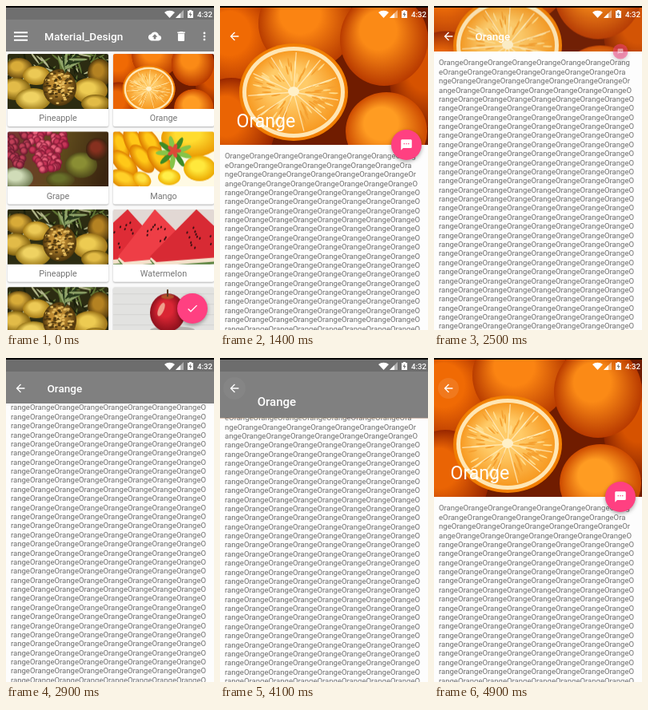
These frames come from a looping animation (260 by 406 pixels, 5700 ms). An HTML page with a canvas:

```html
<!DOCTYPE html>
<html>
<head>
<meta charset="utf-8">
<style>
html, body { margin: 0; width: 260px; height: 406px; overflow: hidden; background: #fafafa; }
canvas { display: block; }
</style>
</head>
<body>
<canvas id="stage" width="260" height="406"></canvas>
<script>
const LOOP = 5700, STEP = 100, TOP = 2, DP = 0.677;
const PINK = '#ff4081', GRAY = '#808080', FONT = 'Roboto, sans-serif';
const screen = document.getElementById('stage').getContext('2d');

const ICONS = {
  menu: 'M3 18h18v-2H3v2zm0-5h18v-2H3v2zm0-7v2h18V6H3z',
  upload: 'M19.35 10.04C18.67 6.59 15.64 4 12 4 9.11 4 6.6 5.64 5.35 8.04 2.34 8.36 0 10.91 0 14c0 3.31 2.69 6 6 6h13c2.76 0 5-2.24 5-5 0-2.64-2.05-4.78-4.65-4.96zM14 13v4h-4v-4H7l5-5 5 5h-3z',
  trash: 'M6 19c0 1.1.9 2 2 2h8c1.1 0 2-.9 2-2V7H6v12zM19 4h-3.5l-1-1h-5l-1 1H5v2h14V4z',
  more: 'M12 8c1.1 0 2-.9 2-2s-.9-2-2-2-2 .9-2 2 .9 2 2 2zm0 2c-1.1 0-2 .9-2 2s.9 2 2 2 2-.9 2-2-.9-2-2-2zm0 6c-1.1 0-2 .9-2 2s.9 2 2 2 2-.9 2-2-.9-2-2-2z',
  check: 'M9 16.17L4.83 12l-1.42 1.41L9 19 21 7l-1.41-1.41z',
  back: 'M20 11H7.83l5.59-5.59L12 4l-8 8 8 8 1.41-1.41L7.83 13H20v-2z',
  chat: 'M20 2H4c-1.1 0-1.99.9-1.99 2L2 22l4-4h14c1.1 0 2-.9 2-2V4c0-1.1-.9-2-2-2zM9 11H7V9h2v2zm4 0h-2V9h2v2zm4 0h-2V9h2v2z'
};
for (const name in ICONS) ICONS[name] = new Path2D(ICONS[name]);

const clamp = v => Math.max(0, Math.min(1, v));
const ramp = (t, from, to) => clamp((t - from) / (to - from));
const smooth = u => u * u * (3 - 2 * u);
const lerp = (a, b, u) => a + (b - a) * u;

function makeRandom(seed) {
  return () => (seed = (seed * 16807) % 2147483647) / 2147483647;
}

function rect(c, x, y, w, h, color) {
  c.fillStyle = color;
  c.fillRect(x, y, w, h);
}

function oval(c, x, y, rx, ry, color, angle = 0) {
  c.fillStyle = color;
  c.beginPath();
  c.ellipse(x, y, rx, ry, angle, 0, 7);
  c.fill();
}

function poly(c, points, color) {
  c.fillStyle = color;
  c.beginPath();
  points.forEach(p => c.lineTo(...p));
  c.fill();
}

// Shaded round body, lit from the upper left
function ball(c, x, y, rx, ry, light, dark, angle = 0) {
  c.save();
  c.translate(x, y);
  c.rotate(angle);
  c.scale(rx, ry);
  const shade = c.createRadialGradient(-.2, -.3, .1, 0, 0, 1);
  shade.addColorStop(0, light);
  shade.addColorStop(.35, light);
  shade.addColorStop(1, dark);
  oval(c, 0, 0, 1, 1, shade);
  c.restore();
}

function text(c, value, x, y, size, color, weight = 400, align = 'left') {
  c.font = `${weight} ${size}px ${FONT}`;
  c.textAlign = align;
  c.fillStyle = color;
  c.fillText(value, x, y);
}

function icon(c, name, x, y, scale = DP) {
  c.save();
  c.translate(x, y);
  c.scale(scale, scale);
  c.translate(-12, -12);
  c.fillStyle = '#fff';
  c.fill(ICONS[name]);
  c.restore();
}

function picture(w, h, paint) {
  const canvas = document.createElement('canvas');
  canvas.width = w;
  canvas.height = h;
  paint(canvas.getContext('2d'));
  return canvas;
}

const orange = picture(260, 172, c => {
  const random = makeRandom(33);
  rect(c, 0, 0, 260, 172, '#701c00');
  ball(c, 262, 90, 50, 60, '#d65200', '#8a2400');
  ball(c, 20, 45, 62, 66, '#f06a04', '#a62c00');
  ball(c, 108, 20, 60, 58, '#fb8412', '#b83c00');
  ball(c, 205, 40, 55, 58, '#fb8a16', '#b83a00');
  ball(c, 14, 148, 55, 60, '#ea6404', '#982600');
  ball(c, 208, 155, 51, 49, '#ff9c22', '#cc4a00');
  ball(c, 92, 106, 68, 61, '#ffae30', '#f07c00');
  oval(c, 92, 106, 64, 57, '#ffe6b4');
  ball(c, 92, 106, 59, 52, '#ffcb68', '#f79a22');
  for (let i = 0; i < 90; i++) {
    const a = random() * 7, r = 18 + random() * 32;
    oval(c, 92 + r * Math.cos(a), 106 + r * .88 * Math.sin(a), 6, 1, i % 2 ? '#ffdc8c' : '#f5a030', a);
  }
  c.strokeStyle = 'rgba(255,240,200,.75)';
  c.lineWidth = 1.3;
  for (let i = 0; i < 11; i++) {
    const a = i * Math.PI * 2 / 11 + .2;
    c.beginPath();
    c.moveTo(92, 106);
    c.lineTo(92 + 57 * Math.cos(a), 106 + 50 * Math.sin(a));
    c.stroke();
  }
  oval(c, 92, 105, 7, 6, '#fff0c8');
});

const pineapple = picture(126, 69, c => {
  const random = makeRandom(71);
  rect(c, 0, 0, 126, 69, '#2c2c12');
  for (let i = 0; i < 90; i++) {
    const x = random() * 126, y = random() * 40, a = random() * 3;
    oval(c, x, y, 9, 1.2, ['#5f7434', '#1b200c', '#b4b88c'][i % 3], a);
  }
  ball(c, 14, 18, 17, 13, '#d8ab38', '#6c4d10');
  ball(c, 36, 27, 17, 12, '#ecc955', '#a67b16');
  ball(c, 10, 44, 19, 14, '#e2bb48', '#80600f');
  ball(c, 32, 57, 22, 14, '#efd262', '#9c7a1a');
  ball(c, 115, 24, 15, 18, '#b48222', '#50380c');
  ball(c, 103, 46, 22, 16, '#edcb52', '#9b7217');
  ball(c, 110, 62, 18, 11, '#e2bb46', '#80600f');
  ball(c, 65, 42, 21, 23, '#bd8a32', '#4f360c');
  for (let i = 0; i < 90; i++) {
    const a = random() * 7, r = Math.sqrt(random());
    oval(c, 65 + 19 * r * Math.cos(a), 42 + 21 * r * Math.sin(a), 2, 1.2, i % 2 ? '#e8bf60' : '#4c360f');
  }
  for (let i = 0; i < 9; i++) {
    oval(c, 68 + i * 2.5, 13 - i % 3 * 3, 12, 1.6, i % 2 ? '#26381a' : '#8fa468', -2 + i * .25);
  }
});

const grape = picture(126, 69, c => {
  const random = makeRandom(19);
  const back = c.createLinearGradient(0, 0, 126, 40);
  back.addColorStop(0, '#7a3434');
  back.addColorStop(.55, '#5e4a1c');
  back.addColorStop(1, '#3a2410');
  rect(c, 0, 0, 126, 69, back);
  ball(c, 92, 42, 20, 16, '#8a8e34', '#504a1a');
  ball(c, 112, 22, 14, 14, '#86301f', '#3a2410');
  ball(c, 66, 60, 18, 10, '#68702a', '#50441a');
  ball(c, 12, 58, 20, 14, '#d0dcb8', '#707c54');
  for (let i = 0; i < 96; i++) {
    const y = i / 2, spread = 23 * (1 - (y / 60) ** 2);
    const side = random() * 2 - 1;
    if (i % 3) ball(c, 51 + side * spread, y, 5, 5, i % 2 ? '#e8607a' : '#c83658', '#7c1430');
    else ball(c, 12 + side * spread * .7, y * .9, 5, 5, '#c04058', '#5e1428');
  }
});

const mango = picture(126, 69, c => {
  rect(c, 0, 0, 126, 69, '#fffae4');
  ball(c, 98, 8, 38, 24, '#ffdc30', '#ea9a04');
  [[8, 18, 1.2], [26, 14, 1.1], [46, 14, 1], [14, 40, .8], [36, 34, .9], [58, 36, .9]].forEach(
    ([x, y, a]) => ball(c, x, y, 21, 11, '#ffc818', '#dc7a00', a));
  ball(c, 14, 60, 20, 11, '#ffd028', '#e08800', .4);
  ball(c, 36, 60, 12, 9, '#ffe040', '#eca000', .5);
  ball(c, 108, 46, 20, 16, '#ffe83c', '#eca800');
  ball(c, 70, 57, 14, 10, '#ffee48', '#f0b000');
  for (let i = 0; i < 9; i++) {
    const a = i * .7 + .3;
    oval(c, 76 + 13 * Math.cos(a), 26 + 11 * Math.sin(a), 10, 3.2, i % 2 ? '#3f8b25' : '#86c448', a);
  }
  for (let i = 0; i < 5; i++) {
    oval(c, 76 + 4 * Math.cos(i * 1.26), 24 + 4 * Math.sin(i * 1.26), 5, 2.5, '#dc4a38', i * 1.26);
  }
});

const melon = picture(126, 69, c => {
  const random = makeRandom(5);
  rect(c, 0, 0, 126, 69, '#e2d8d4');
  [[-45, 18, 66], [6, 52, 104], [46, 104, 160]].forEach(([left, apex, right], i) => {
    poly(c, [[left, 64], [apex, 0], [right, 58], [right, 66], [left + 8, 74]], '#5c8440');
    poly(c, [[left, 62], [apex, 0], [right, 56], [right, 63], [left + 8, 71]], '#f4e2cc');
    poly(c, [[left, 59], [apex, 0], [right, 53], [right - 3, 58], [left + 8, 66]], ['#de2c36', '#ee3e46', '#d82a34'][i]);
    for (let k = 0; k < 12; k++) {
      const u = .3 + random() * .6;
      oval(c, apex + (random() - .5) * 70 * u, 56 * u, 1, 1.6, '#3b1013', .4);
    }
  });
});

const apple = picture(126, 69, c => {
  rect(c, 0, 0, 126, 69, '#e2e2e0');
  for (let y = 8; y < 69; y += 13) rect(c, 0, y, 126, 1, '#d4d4d2');
  oval(c, 74, 54, 28, 5, '#b5b1ae');
  ball(c, 68, 32, 22, 24, '#da2634', '#8c101c');
  oval(c, 60, 28, 3.5, 9, '#f0a08c', .4);
  oval(c, 68, 12, 8, 3, '#b0502a');
  rect(c, 67, 3, 2, 9, '#5b3a20');
});

const CARDS = [['Pineapple', pineapple], ['Orange', orange], ['Grape', grape], ['Mango', mango],
  ['Pineapple', pineapple], ['Watermelon', melon], ['Pineapple', pineapple], ['Apple', apple]];

function card(c, [label, image], x, y) {
  c.save();
  c.shadowColor = 'rgba(0,0,0,.3)';
  c.shadowBlur = 2;
  c.shadowOffsetY = 1;
  c.fillStyle = '#fff';
  c.beginPath();
  c.roundRect(x, y, 126, 91, 2);
  c.fill();
  c.restore();
  c.save();
  c.beginPath();
  c.roundRect(x, y, 126, 69, [2, 2, 0, 0]);
  c.clip();
  const h = image.height * 126 / image.width;
  c.drawImage(image, x, y + (69 - h) / 2, 126, h);
  c.restore();
  text(c, label, x + 63, y + 84.3, 10.83, '#757575', 400, 'center');
}

function fab(c, name, y, scale) {
  if (scale <= 0) return;
  c.save();
  c.globalAlpha *= scale;
  c.translate(233, y);
  c.scale(scale, scale);
  c.save();
  c.shadowColor = 'rgba(0,0,0,.35)';
  c.shadowBlur = 5;
  c.shadowOffsetY = 2;
  oval(c, 0, 0, 19, 19, PINK);
  c.restore();
  icon(c, name, 0, 0);
  c.restore();
}

function statusIcons(c) {
  poly(c, [[198, 8], [201, 6.3], [204.5, 5.7], [208, 6.3], [211, 8], [204.5, 15]], '#fff');
  poly(c, [[212, 15], [222, 15], [222, 5]], 'rgba(255,255,255,.45)');
  poly(c, [[212, 15], [218, 15], [218, 9]], '#fff');
  rect(c, 227, 6, 7, 9, '#fff');
  rect(c, 229, 5, 3, 1, '#fff');
  poly(c, [[231, 7], [228.5, 11], [230.2, 11], [229.8, 14], [232.5, 10], [230.8, 10]], '#777');
  text(c, '4:32', 239, 14, 9.7, '#fff', 500);
}

function drawGrid(c) {
  rect(c, 0, 0, 260, 406, '#fafafa');
  CARDS.forEach((item, i) => card(c, item, i % 2 ? 134 : 2, 60 + 97.4 * (i >> 1)));
  rect(c, 0, TOP, 260, 55, GRAY);
  rect(c, 0, TOP, 260, 15, '#6f6f6f');
  icon(c, 'menu', 18.5, 38, .95);
  text(c, 'Material_Design', 48, 43, 13.6, '#fff', 500);
  icon(c, 'upload', 186, 38);
  icon(c, 'trash', 219, 38);
  icon(c, 'more', 248, 38);
  fab(c, 'check', 379, 1);
}

// Character wrap settles into the same line from the fifth row on
const HEADS = ['', 'e', 'nge', 'ange', 'range'];
const TAILS = ['Orang', 'Ora', 'Or', 'O', 'O'];

function drawDetail(c, t) {
  const fold = smooth(ramp(t, 2000, 2500)) - smooth(ramp(t, 4000, 4400));
  const scroll = 100 * (smooth(ramp(t, 2500, 2900)) - smooth(ramp(t, 3900, 4200)));
  const scrim = t < 4300 ? ramp(t, 2400, 2900) ** 2 : (1 - ramp(t, 4300, 4900)) ** 3;
  const fabScale = ramp(t, 1200, 1400) - ramp(t, 2400, 2600) + ramp(t, 4100, 4400);
  const bottom = 174 - 117 * fold;

  rect(c, 0, TOP, 260, 404, '#fdfdfd');
  for (let i = 0; i < 50; i++) {
    const k = Math.min(i, 4);
    text(c, HEADS[k] + 'Orange'.repeat(7) + TAILS[k], 6, bottom + 17.4 + 11.38 * i - scroll, 9.56, '#6c6c6c');
  }

  c.save();
  c.beginPath();
  c.rect(0, TOP, 260, bottom - TOP);
  c.clip();
  c.drawImage(orange, 0, TOP - 58.5 * fold);
  c.globalAlpha = scrim;
  rect(c, 0, TOP, 260, 172, GRAY);
  rect(c, 0, TOP, 260, 15, 'rgba(0,0,0,.15)');
  c.restore();

  if (t >= 3900 && t < 4200) oval(c, 18, 38, 14, 14, `rgba(255,255,255,${.12 * (1 - ramp(t, 3900, 4200))})`);
  if (t >= 4900) oval(c, 18, 38, 13, 13, 'rgba(255,255,255,.1)');
  icon(c, 'back', 18, 38);
  const size = lerp(23.1, 13.54, fold);
  text(c, 'Orange', lerp(20.5, 51.5, fold), lerp(152, 43, fold), size, '#fff', fold > .5 ? 500 : 400);
  // On entry the bubble shows before its disc has grown
  if (t < 1400) icon(c, 'chat', 233, bottom);
  fab(c, 'chat', bottom, fabScale);
}

const layer = picture(260, 406, () => {}).getContext('2d');

function draw(t) {
  drawGrid(screen);
  if (t >= 1200) {
    layer.clearRect(0, 0, 260, 406);
    drawDetail(layer, t);
    screen.globalAlpha = lerp(.52, 1, ramp(t, 1200, 1400));
    screen.drawImage(layer.canvas, 0, 21 * (1 - ramp(t, 1200, 1400)) ** 2);
    screen.globalAlpha = 1;
  }
  rect(screen, 0, 0, 260, TOP, '#000');
  statusIcons(screen);
}

const start = performance.now();
function tick() {
  const t = (performance.now() - start) % LOOP;
  draw(Math.floor(t / STEP) * STEP);
  requestAnimationFrame(tick);
}
tick();
</script>
</body>
</html>
```
